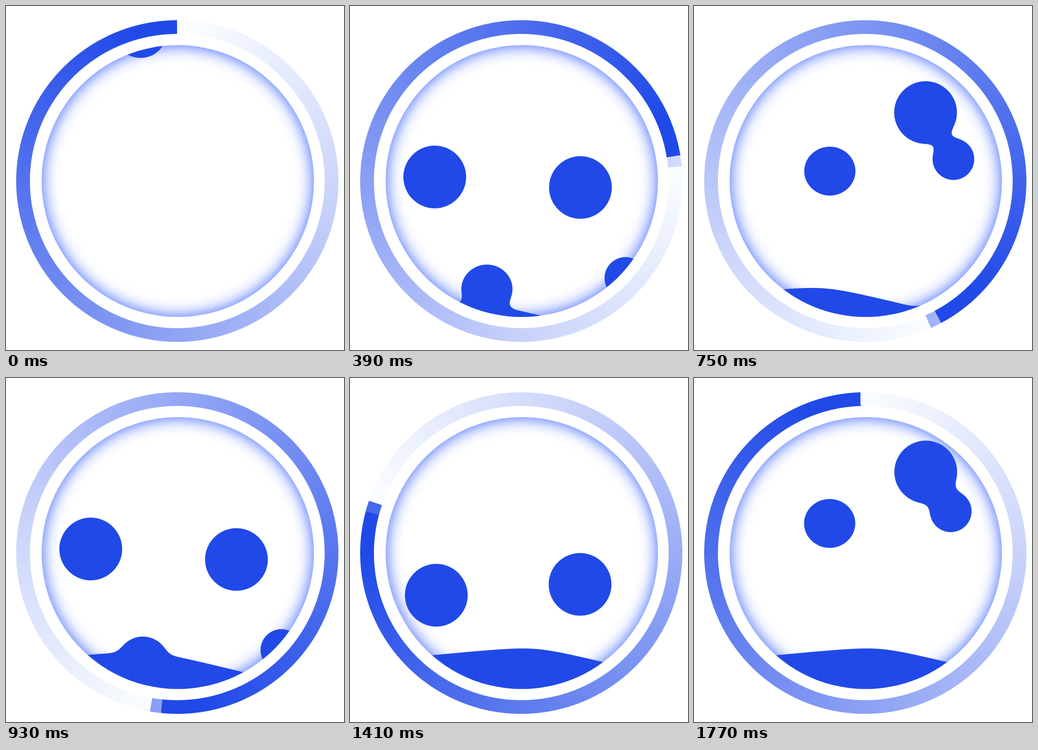
Recreate the animation shown at these times as an HTML page. Size 664 by 677 pixels, loop 1.8 s.

```html
<!DOCTYPE html>
<html lang="en">
<head>
<meta charset="utf-8">
<title>Filling loader</title>
<style>
  html, body { margin: 0; width: 100%; height: 100%; overflow: hidden; background: #fff; }
  .ring, .glow, svg { position: absolute; }
  .ring {
    --turn: 0deg;
    --fade: transparent 4deg, #fbfeff 4deg, #cdd6fb 90deg, #2049e8 345deg;
    --band: radial-gradient(closest-side, transparent 289px, #000 290px, #000 316px, transparent 317px);
    left: 20px; top: 28px; width: 633px; height: 633px;
    /* the turning sweep has a gap that shows the still one below */
    background: conic-gradient(from var(--turn), var(--fade)), conic-gradient(var(--fade));
    -webkit-mask: var(--band);
    mask: var(--band);
  }
  .glow {
    left: 70px; top: 77px; width: 535px; height: 535px; border-radius: 50%;
    box-shadow: inset 0 0 32px #335cff;
  }
  svg { left: 0; top: 0; width: 100%; height: 100%; overflow: hidden; }
</style>
</head>
<body>
<div class="ring" id="ring"></div>
<div class="glow"></div>
<svg>
  <defs>
    <clipPath id="bowl"><circle cx="337.5" cy="344.5" r="267.5"/></clipPath>
    <filter id="goo" filterUnits="userSpaceOnUse" x="-40" y="-120" width="760" height="920"
            color-interpolation-filters="sRGB">
      <feGaussianBlur stdDeviation="10"/>
      <feColorMatrix values="0 0 0 0 .1255  0 0 0 0 .2863  0 0 0 0 .9098  0 0 0 24 -11.5"/>
    </filter>
  </defs>
  <g clip-path="url(#bowl)">
    <g filter="url(#goo)" id="fluid"><path id="pool"/></g>
  </g>
</svg>
<script>
const LOOP = 1800, STEP = 30;
const ring = document.getElementById('ring');
const fluid = document.getElementById('fluid');
const pool = document.getElementById('pool');

// Ring angle: [step, degrees]
const turns = [[0, 0], [19, 118], [39, 231], [47, 285], [60, 360]];

function angle(k) {
  const i = turns.findIndex(([step]) => step > k);
  const [k0, a0] = turns[i - 1], [k1, a1] = turns[i];
  return a0 + (a1 - a0) * (k - k0) / (k1 - k0);
}

// Steps at which a shower of four drops begins
const showers = [0, 18, 32, 53];

// Start point and speed per step of each drop
const drops = [
  { rx: 62.4, ry: 62.4, x: 457.5, y: 37.5, vx: -0.37, vy: 24.58 },
  { rx: 51.3, ry: 49, x: 264.4, y: 54, vx: 0.35, vy: 38.7 },
  { rx: 42.2, ry: 42.2, x: 473, y: 28.3, vx: 5.23, vy: 39 },
  { rx: 62.4, ry: 62.4, x: 147, y: -255, vx: 1.5, vy: 45.5 }
];

const balls = showers.flatMap(start => drops.map(drop => {
  const el = document.createElementNS('http://www.w3.org/2000/svg', 'ellipse');
  el.setAttribute('rx', drop.rx);
  el.setAttribute('ry', drop.ry);
  fluid.append(el);
  return { ...drop, el, start };
}));

const clamp = v => Math.min(1, Math.max(0, v));
const smooth = v => v * v * (3 - 2 * v);

// The pool rises, then its rounded crest slides to the right
function surface(k) {
  const top = 533 + 2.6 * Math.max(0, 33.7 - k);
  const crest = 257 + 107 * smooth(clamp((k - 25) / 20));
  let d = 'M0 800';
  for (let x = 0; x <= 664; x += 8) {
    const u = x - crest;
    d += `L${x} ${top + 0.075 * u + 0.175 * (Math.hypot(u, 50) - 50)}`;
  }
  return d + 'V800Z';
}

function draw(k) {
  ring.style.setProperty('--turn', angle(k) + 'deg');
  pool.setAttribute('d', surface(k));
  for (const { el, start, x, y, vx, vy } of balls) {
    const age = k - start;
    el.setAttribute('display', age < 0 ? 'none' : 'inline');
    el.setAttribute('cx', x + vx * age);
    el.setAttribute('cy', y + vy * age);
  }
}

const begin = performance.now();
let shown = -1;
function tick() {
  const t = Math.max(0, performance.now() - begin) % LOOP;
  let k = Math.floor(t / STEP);
  if (k < 3) k = 0; // the opening pose is held
  if (k !== shown) draw(shown = k);
  requestAnimationFrame(tick);
}
tick();
</script>
</body>
</html>
```
